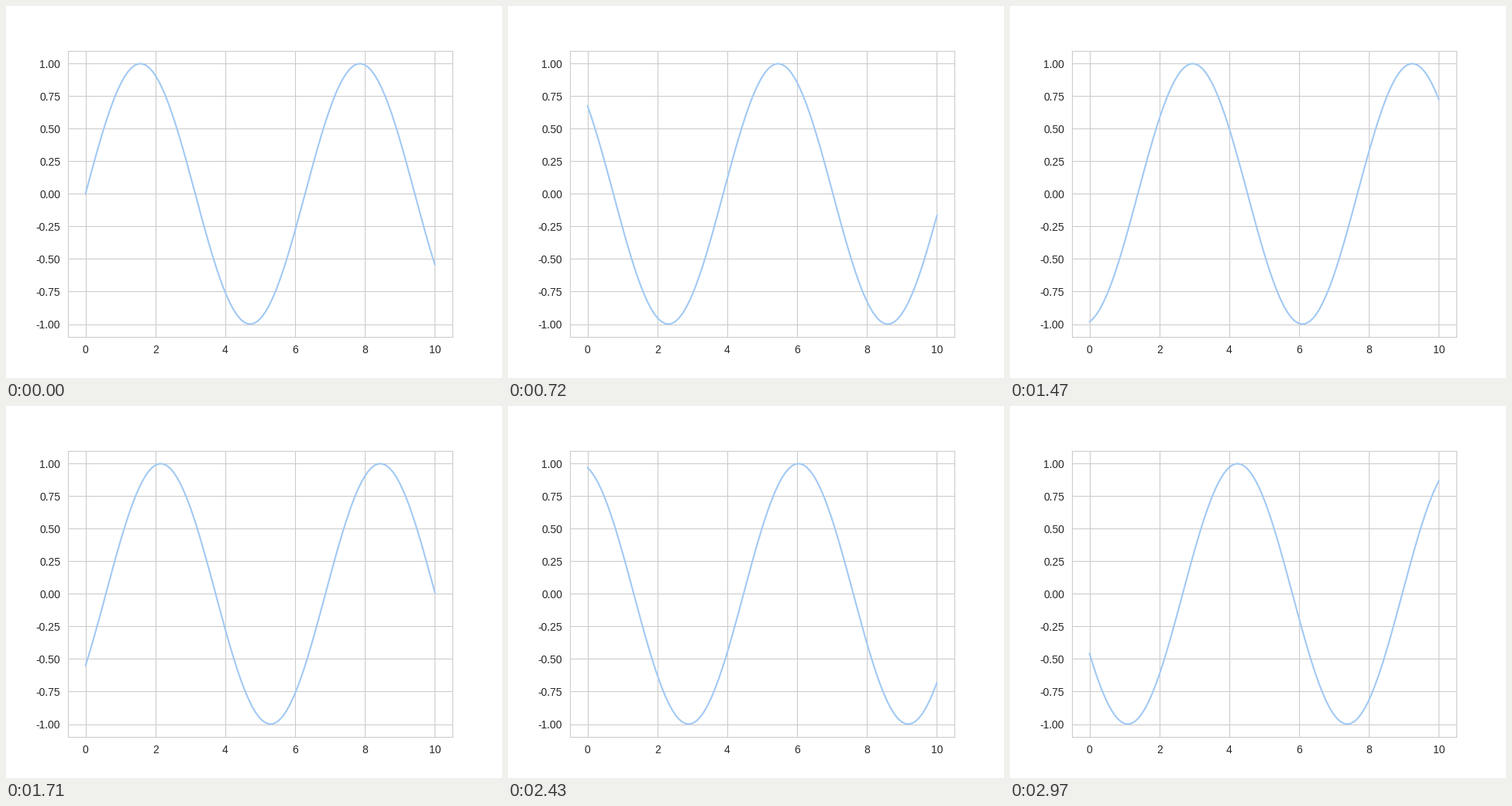
Write a matplotlib script that moves like this. It is 640x480 px and loops after 3 s.

```python
import numpy as np
import matplotlib.pyplot as plt
from matplotlib.animation import FuncAnimation

FRAMES = 100
INTERVAL = 30  # ms
PHASE_STEP = 0.1

plt.rcParams.update({
    "font.family": "Liberation Sans",
    "font.size": 10,
    "axes.unicode_minus": False,
    "axes.edgecolor": "0.8",
    "axes.grid": True,
    "axes.axisbelow": True,
    "grid.color": "0.8",
    "grid.linestyle": "-",
    "xtick.color": "0.15",
    "ytick.color": "0.15",
    "xtick.bottom": False,
    "ytick.left": False,
    "lines.solid_capstyle": "round",
})

fig, ax = plt.subplots(figsize=(6.4, 4.8), dpi=100)
x = np.linspace(0, 10, 100)
line, = ax.plot(x, np.sin(x), color="#A1C9F4", lw=1.5)
ax.set_xlim(ax.get_xlim())
ax.set_ylim(ax.get_ylim())


def update(i):
    line.set_ydata(np.sin(x + PHASE_STEP * i))
    return line,


anim = FuncAnimation(fig, update, frames=FRAMES, interval=INTERVAL,
                     repeat=True, repeat_delay=0)
plt.show()
```
